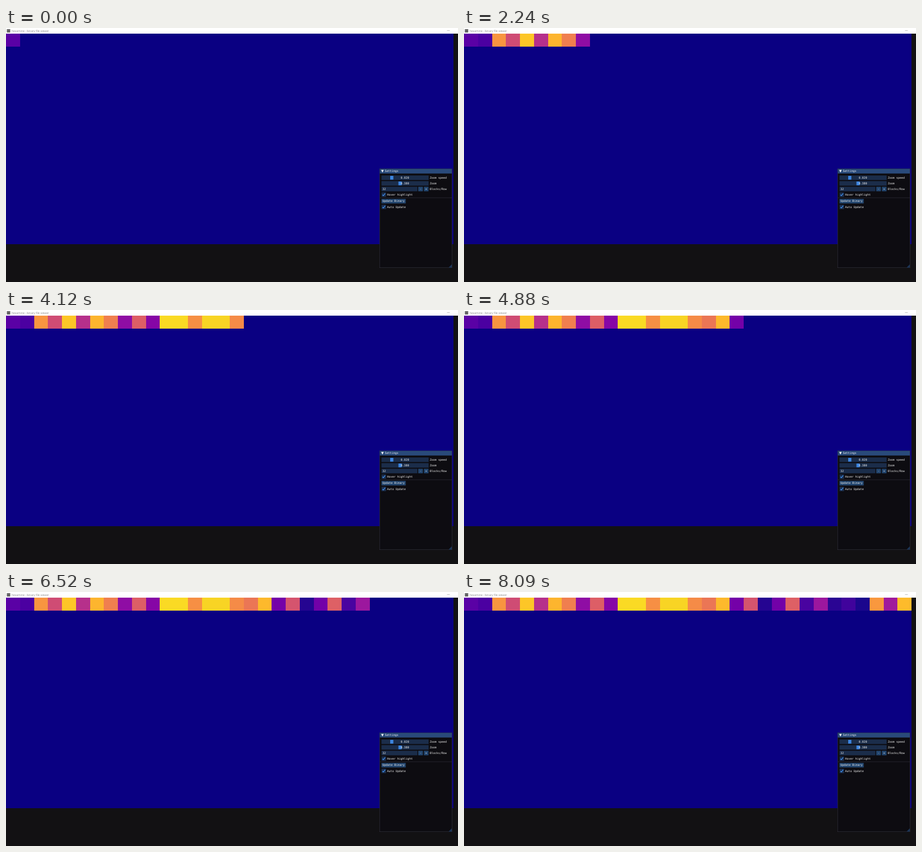
Recreate the animation shown at these times as an HTML page. Size 800 by 450 pixels, loop 8.12 s.

```html
<!DOCTYPE html>
<html lang="en">
<head>
<meta charset="utf-8">
<title>hexamine</title>
<style>
  html, body { margin: 0; width: 100%; height: 100%; overflow: hidden; background: #121113; }
  #stage { position: relative; width: 800px; height: 450px; overflow: hidden; }
  #stage > * { position: absolute; }
  #grid { left: 0; top: 10px; width: 792px; height: 373px; background: #0a0082; }

  /* One more block every 250 ms; the first step comes at 370 ms. */
  #strip {
    left: 0; top: 10px; width: 24.75px; height: 23.3px; overflow: hidden;
    animation: reveal 8120ms infinite;
  }
  #strip i { position: absolute; top: 0; width: 24.75px; height: 100%; }
  @keyframes reveal {
    0% { width: 24.75px; animation-timing-function: step-end; }
    4.5567% { width: 24.75px; animation-timing-function: steps(31, start); }
    100% { width: 792px; }
  }

  svg { left: 0; top: 0; }
  text { text-rendering: geometricPrecision; white-space: pre; }
  .title { font: 4.95px "Open Sans", "Noto Sans", sans-serif; fill: #858585; }
  .ui text { font: 5px "DejaVu Sans Mono", "Noto Sans Mono", monospace; fill: #f0f0f0; }
  .frame { fill: #1b2d4a; }
  .button { fill: #23466f; }
  .grab { fill: #3d85e0; }
  .check { fill: none; stroke: #4296fa; stroke-width: 1.1; }
</style>
</head>
<body>
<div id="stage">
  <div id="grid"></div>
  <div id="strip"></div>
  <svg width="800" height="450" viewBox="0 0 800 450">
    <rect width="800" height="10" fill="#fff"/>
    <rect x="1.5" y="2" width="6" height="6" fill="#666"/>
    <text class="title" x="10" y="6.8">hexamine - binary file viewer</text>
    <path d="M780.5 4.5h5" stroke="#999" stroke-width=".6"/>

    <g class="ui">
      <rect x="661.25" y="249.25" width="128" height="175.5" fill="#0d0c11" stroke="#3c3c48" stroke-width=".5"/>
      <rect x="661.5" y="249.5" width="127.5" height="8.3" fill="#294a7a"/>
      <path d="M664 251.6h4.6l-2.3 4.4z" fill="#fff"/>
      <text x="670.5" y="255.4">Settings</text>

      <rect class="frame" x="664.5" y="261.3" width="83.5" height="8"/>
      <rect class="grab" x="680" y="262" width="5.6" height="6.6"/>
      <text x="698.5" y="266.9">0.020</text>
      <text x="750" y="266.9">Zoom speed</text>

      <rect class="frame" x="664.5" y="271.3" width="83.5" height="8"/>
      <rect class="grab" x="694.6" y="272" width="5.8" height="6.6"/>
      <text x="698.5" y="276.9">0.380</text>
      <text x="750" y="276.9">Zoom</text>

      <rect class="frame" x="664.5" y="281.3" width="63.5" height="8"/>
      <text x="666.3" y="286.9">32</text>
      <rect class="button" x="729.6" y="281.3" width="8.2" height="8"/>
      <text x="732.2" y="286.9">-</text>
      <rect class="button" x="739.6" y="281.3" width="8.2" height="8"/>
      <text x="742.2" y="286.9">+</text>
      <text x="750" y="286.9">Blocks/Row</text>

      <rect class="frame" x="664.6" y="291.3" width="8" height="8"/>
      <path class="check" d="M666.3 295.4l1.6 1.8 3.2-4"/>
      <text x="674.5" y="296.9">Hover highlight</text>

      <path d="M661.5 300.8h127.5" stroke="#35353f" stroke-width=".6"/>

      <rect class="button" x="664.5" y="302.8" width="43" height="8"/>
      <text x="666.3" y="308.4">Update Binary</text>

      <rect class="frame" x="664.6" y="313" width="8" height="8"/>
      <path class="check" d="M666.3 317.1l1.6 1.8 3.2-4"/>
      <text x="674.5" y="318.6">Auto Update</text>

      <path d="M789 418.8v5.7h-5.7z" fill="#1b3558"/>
    </g>
  </svg>
</div>
<script>
  const colors = `5a01a5 4b00a1 f89540 cf4c74 fdc627 b6308b fdb52e f07f4f
    8f0da4 dd5e66 8606a6 fada24 fada24 f68f44 f8d424 f8d424
    f58b47 eb7655 fdb92c 7401a8 d5546e 250591 7201a8 de6065
    4903a0 9c179e 2a0593 40039c 1b068d f9983e a01a9c fdbb2b`.split(/\s+/);
  const strip = document.getElementById('strip');
  colors.forEach((color, i) => {
    const block = document.createElement('i');
    block.style.left = i * 24.75 + 'px';
    block.style.background = '#' + color;
    strip.append(block);
  });
</script>
</body>
</html>
```
